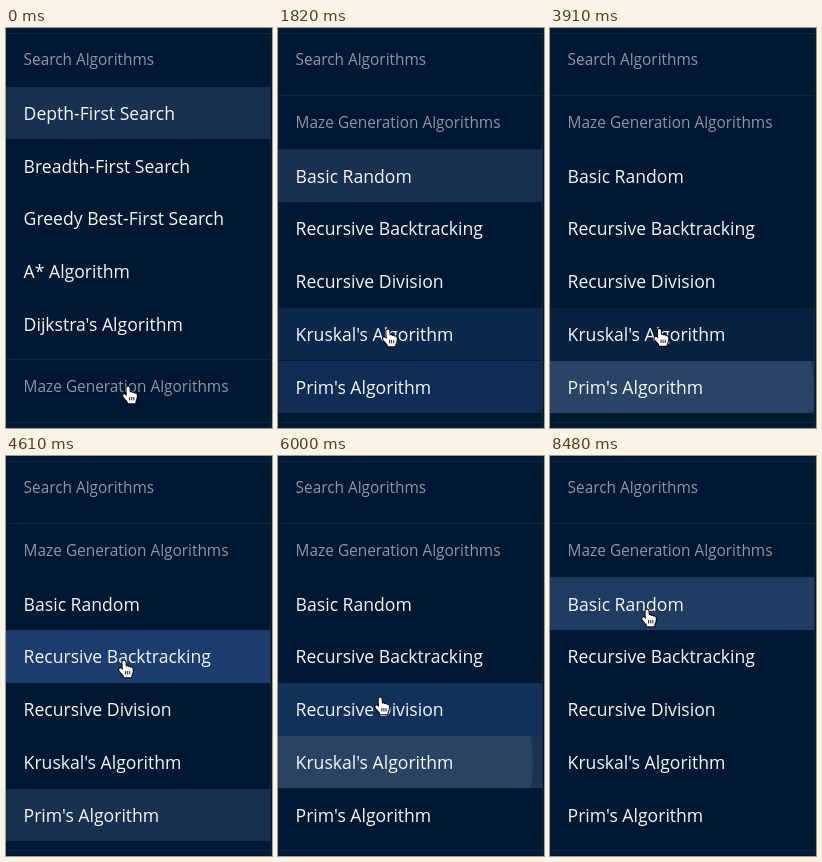
An HTML page with a canvas for the animation above (8510 ms loop, 266x400 px).

```html
<!DOCTYPE html>
<html lang="en">
<head>
<meta charset="utf-8">
<title>Algorithm menu</title>
<style>
  html, body { margin: 0; width: 100%; height: 100%; overflow: hidden; background: #001831; }
  canvas { display: block; width: 266px; height: 400px; }
</style>
</head>
<body>
<canvas id="stage"></canvas>
<script>
const W = 266, H = 400, LOOP = 8510;
const SIDE = 264, ROW = 52.8, PAD = 8.8, LINE = 1.1, TOP = 4.7, LEFT = 17.6;
const FADE = 150, RIPPLE = 550;
const TOGGLE = 1030, TOGGLE_TIME = 320;

const BG = [0, 24, 49], SELECTED = [25, 49, 80];
const HOVER = [27, 61, 112], SELECTED_HOVER = [32, 60, 99];
const DIVIDER = '#0f2943', TITLE = '#8b97a7', TEXT = '#f4f6f8';

const search = {
  title: 'Search Algorithms',
  items: ['Depth-First Search', 'Breadth-First Search', 'Greedy Best-First Search',
    'A* Algorithm', "Dijkstra's Algorithm"]
};
const maze = {
  title: 'Maze Generation Algorithms',
  items: ['Basic Random', 'Recursive Backtracking', 'Recursive Division',
    "Kruskal's Algorithm", "Prim's Algorithm"]
};

// Pointer moves: start, end, target x, target y
const START = [122, 359];
const MOVES = [
  [1650, 1990, 98, 246],
  [2560, 3140, 104, 362],
  [3780, 4090, 118, 205],
  [5000, 5322, 106, 306],
  [5800, 6250, 97, 154]
];

// Clicks: press, release, row
const CLICKS = [
  [2300, 2380, 2],
  [3400, 3510, 4],
  [4560, 4650, 1],
  [5540, 5630, 3],
  [6800, 6920, 0]
];

const canvas = document.getElementById('stage');
const ctx = canvas.getContext('2d');
const dpr = window.devicePixelRatio || 1;
canvas.width = W * dpr;
canvas.height = H * dpr;

const clamp = v => Math.min(1, Math.max(0, v));
const smooth = v => { v = clamp(v); return v * v * (3 - 2 * v); };
const lerp = (a, b, k) => a + (b - a) * k;
const mix = (a, b, k) => a.map((v, i) => lerp(v, b[i], k));
const css = c => `rgb(${c.map(Math.round).join(',')})`;

function pointer(t) {
  let [x, y] = START;
  for (const [from, to, tx, ty] of MOVES) {
    const k = smooth((t - from) / (to - from));
    x = lerp(x, tx, k);
    y = lerp(y, ty, k);
  }
  return { x, y };
}

const openness = t => smooth((t - TOGGLE) / TOGGLE_TIME);

function layout(t) {
  const k = openness(t);
  const full = ROW * 5;
  const searchTitle = TOP + LINE;
  const searchItems = searchTitle + ROW;
  const divider = searchItems + full * (1 - k) + PAD;
  const mazeItems = divider + LINE + ROW;
  return {
    searchTitle, searchItems, searchHeight: full * (1 - k),
    divider, mazeTitle: divider + LINE, mazeItems, mazeHeight: full * k
  };
}

function hoveredRow(t) {
  const l = layout(t), dy = pointer(t).y - l.mazeItems;
  return dy >= 0 && dy < l.mazeHeight ? Math.floor(dy / ROW) : -1;
}

// Share of the last fade period the pointer spent over the row
function hoverAmount(row, t) {
  const n = 15;
  let hits = 0;
  for (let i = 0; i < n; i++) if (hoveredRow(t - i * FADE / n) === row) hits++;
  return smooth(hits / n);
}

function selectedAmount(row, t) {
  let amount = row === 0 ? 1 : 0;
  for (const [, release, target] of CLICKS) {
    amount = lerp(amount, row === target ? 1 : 0, smooth((t - release) / FADE));
  }
  return amount;
}

function text(str, y, size, color) {
  ctx.font = `${size}px "Open Sans", "Noto Sans", sans-serif`;
  ctx.fillStyle = color;
  ctx.fillText(str, LEFT, y);
}

function clipRect(y, h, draw) {
  if (h <= 0) return;
  ctx.save();
  ctx.beginPath();
  ctx.rect(0, y, SIDE, h);
  ctx.clip();
  draw();
  ctx.restore();
}

function drawRipples(row, y, t) {
  for (const [press, release, target] of CLICKS) {
    if (target !== row || t < press || t > release + RIPPLE) continue;
    const p = pointer(press);
    const grow = smooth((t - press) / RIPPLE);
    const fade = 1 - smooth((t - release) / RIPPLE);
    const radius = Math.hypot(Math.max(p.x, SIDE - p.x), ROW / 2);
    clipRect(y, ROW, () => {
      ctx.fillStyle = `rgba(255,255,255,${lerp(0.1, 0.3, grow) * fade})`;
      ctx.beginPath();
      ctx.arc(p.x, p.y, radius * grow, 0, Math.PI * 2);
      ctx.fill();
    });
  }
}

function drawItems(items, top, height, t, live) {
  clipRect(top, height, () => {
    items.forEach((label, i) => {
      const y = top + i * ROW;
      const s = live ? selectedAmount(i, t) : (i === 0 ? 1 : 0);
      const h = live ? hoverAmount(i, t) : 0;
      if (s + h > 0) {
        ctx.fillStyle = css(mix(mix(BG, SELECTED, s), mix(HOVER, SELECTED_HOVER, s), h));
        const y0 = Math.round(y);
        ctx.fillRect(0, y0, SIDE, Math.round(y + ROW) - y0);
      }
      text(label, y + ROW / 2 + 6.8, 17.6, TEXT);
      if (live) drawRipples(i, y, t);
    });
  });
}

function drawDivider(y) {
  ctx.fillStyle = DIVIDER;
  ctx.fillRect(0, Math.round(y), SIDE, 1);
}

const hand = new Path2D(
  'M-1.6 1 Q-1.4 -.5 0 -.5 Q1.4 -.5 1.5 1 L1.8 5.4 Q3.4 4.6 4.3 6 ' +
  'Q5.8 5.3 6.6 6.7 Q8.4 6.2 8.8 8 Q9 10 8.4 12 L7.4 14.4 L7.3 16.2 ' +
  'L-.2 16.2 L-.4 14.6 Q-3 11.8 -4.7 9.4 Q-5.4 7.8 -4 7.3 Q-2.7 7.1 -1.1 9 Z');
const knuckles = new Path2D('M1.6 10 V13.4 M3.7 10 V13.4 M5.8 10 V13.4');

function drawPointer({ x, y }) {
  ctx.save();
  ctx.translate(x, y);
  ctx.lineJoin = 'round';
  ctx.strokeStyle = '#05080d';
  ctx.lineWidth = 2;
  ctx.stroke(hand);
  ctx.fillStyle = '#fff';
  ctx.fill(hand);
  ctx.lineWidth = 0.9;
  ctx.stroke(knuckles);
  ctx.restore();
}

function render(t) {
  const l = layout(t);
  ctx.setTransform(dpr, 0, 0, dpr, 0, 0);
  ctx.fillStyle = css(BG);
  ctx.fillRect(0, 0, W, H);

  drawDivider(TOP);
  text(search.title, l.searchTitle + 31.5, 15.4, TITLE);
  drawItems(search.items, l.searchItems, l.searchHeight, t, false);

  drawDivider(l.divider);
  text(maze.title, l.mazeTitle + 31.5, 15.4, TITLE);
  drawItems(maze.items, l.mazeItems, l.mazeHeight, t, true);

  drawDivider(l.mazeItems + l.mazeHeight + PAD);
  ctx.fillStyle = DIVIDER;
  ctx.fillRect(SIDE, 0, 1, H);
  drawPointer(pointer(t));
}

const begin = performance.now();
function tick() {
  render((performance.now() - begin) % LOOP);
  requestAnimationFrame(tick);
}
tick();
</script>
</body>
</html>
```
